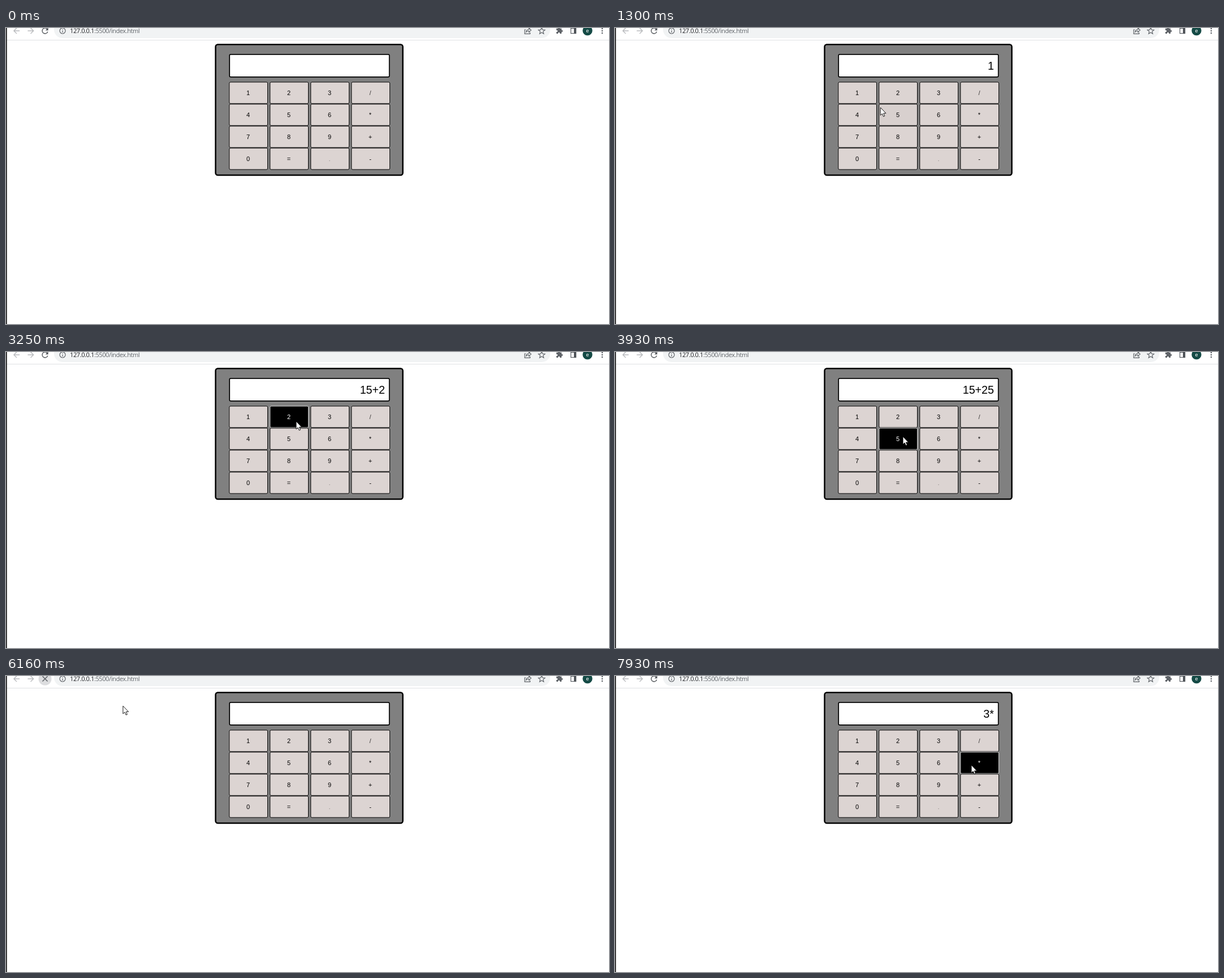
These frames come from a looping animation (1066x525 px, 8 s). An HTML page:

```html
<!DOCTYPE html>
<html lang="en">
<head>
<meta charset="utf-8">
<title>Calculator</title>
<style>
html, body { margin: 0; width: 100%; height: 100%; overflow: hidden; background: #fff; }
svg { display: block; width: 1066px; height: 525px; }
text { font-family: "Liberation Sans", Arial, sans-serif; }
.key text { font-size: 11px; text-anchor: middle; }
.url { font: 11px "Open Sans", "Noto Sans", sans-serif; letter-spacing: -.4px; fill: #5f6368; }
.line { fill: none; stroke: #5f6368; stroke-width: 1.2; }
</style>
</head>
<body>
<svg viewBox="0 0 1066 525">
  <!-- browser bar -->
  <rect x="85" y="-12" width="877" height="30" rx="15" fill="#f1f3f4"/>
  <rect y="21" width="1066" height="1" fill="#dfe1e4"/>
  <g fill="#b9bbbe">
    <path id="back" transform="translate(10.1 -3.4) scale(.7)" d="M20 11H7.83l5.59-5.59L12 4l-8 8 8 8 1.41-1.41L7.83 13H20z"/>
    <use href="#back" transform="matrix(-1 0 0 1 62.5 0)"/>
  </g>
  <circle id="halo" cx="69" cy="5" r="11.5" fill="#dcdddf"/>
  <path id="reload" fill="#505459" transform="translate(60.6 -3.4) scale(.7)" d="M17.65 6.35A8 8 0 1 0 19.73 14h-2.08A6 6 0 1 1 12 6c1.66 0 3.14.69 4.22 1.78L13 11h7V4z"/>
  <path id="stop" class="line" style="stroke-width:1.5" d="M64.5 .5l9 9m0-9l-9 9"/>
  <circle class="line" cx="100" cy="5" r="5"/>
  <path class="line" d="M100 4.5v3.5M100 2v1.3"/>
  <text class="url" x="113" y="9"><tspan fill="#202124">127.0.0.1</tspan>:5500/index.html</text>
  <path class="line" d="M919 3h-2v7.4h9.5V8M919.5 7c.4-3 2.500-4.500 5-4.500V0l3.800 3.800-3.800 3.800V5c-2 0-3.500.4-5 2z"/>
  <path class="line" d="M947-.8l1.600 3.900 4.200.3-3.200 2.700 1 4.100-3.600-2.200-3.600 2.200 1-4.100-3.200-2.700 4.200-.3z"/>
  <path fill="#5f6368" transform="translate(971.8 -2) scale(.55)" d="M20.5 11H19V7c0-1.100-.9-2-2-2h-4V3.500a2.500 2.500 0 0 0-5 0V5H4c-1.100 0-2 .9-2 2v3.800h1.500a2.700 2.700 0 0 1 0 5.400H2V20c0 1.100.9 2 2 2h3.800v-1.500a2.700 2.700 0 0 1 5.400 0V22H17c1.100 0 2-.9 2-2v-4h1.500a2.500 2.500 0 0 0 0-5z"/>
  <rect class="line" x="998.6" y=".6" width="9" height="9"/>
  <rect x="1004" width="4" height="10" fill="#505459"/>
  <circle cx="1028" cy="4.700" r="8.600" fill="#144a45"/>
  <text x="1028" y="8" font-size="9" fill="#fff" text-anchor="middle">e</text>
  <path d="M1054 1v0m0 4v0m0 4v0" stroke="#5f6368" stroke-width="2.600" stroke-linecap="round"/>
  <rect width="1.600" height="525" fill="#111"/>

  <!-- calculator -->
  <rect x="370.500" y="29.300" width="331" height="231.700" rx="4" fill="#808080" stroke="#000" stroke-width="2.500"/>
  <rect x="395.200" y="46.800" width="282.500" height="40" rx="2" fill="#fff" stroke="#000" stroke-width="1.700"/>
  <text id="display" x="669.800" y="73.600" font-size="19.600" text-anchor="end"></text>
  <g id="keys"></g>
  <path id="cursor" d="M0 0V13.800L3.100 11 5.300 16 7.500 15 5.400 10.200H9.700z" fill="#fff" stroke="#000" stroke-width=".9"/>
</svg>
<script>
const LOOP = 8000, FADE = 500, CLICK_LEAD = 150, LOAD = 350;
const LAYOUT = '123/456*789+0=.-', RELOAD = 'reload';
const LEFT = 394.3, TOP = 95.5, COL = 72, ROW = 39;
const $ = id => document.getElementById(id);

const stop = (arrive, leave, x, y, click) => ({ arrive, leave, x, y, click });

// The pointer rests at each stop and clicks shortly before it leaves.
const stops = [
  stop(0, 130, 790, 366),
  stop(550, 550, 377, 118),
  stop(760, 1150, 413, 117, '1'),
  stop(1370, 1950, 495, 152, '5'),
  stop(2145, 2600, 637, 194, '+'),
  stop(2780, 3380, 513, 123, '2'),
  stop(3600, 4000, 509, 150, '5'),
  stop(4210, 5060, 501, 241, '='),
  stop(5530, 5530, 41, 20),
  stop(5700, 6020, 67, 3, RELOAD),
  stop(6160, 6160, 206, 53),
  stop(6600, 6900, 572, 121, '3'),
  stop(7200, 7250, 640, 190),
  stop(7450, LOOP, 630, 158, '*')
];
const clicks = stops.filter(s => s.click).map(s => ({ key: s.click, time: s.leave - CLICK_LEAD }));
const reloadTime = clicks.find(c => c.key === RELOAD).time;

const svgNode = (tag, attrs, parent) => {
  const node = document.createElementNS('http://www.w3.org/2000/svg', tag);
  for (const name in attrs) node.setAttribute(name, attrs[name]);
  return parent.appendChild(node);
};

const keys = [...LAYOUT].map((char, i) => {
  const x = LEFT + COL * (i % 4), y = TOP + ROW * Math.floor(i / 4);
  const g = svgNode('g', { class: 'key' }, $('keys'));
  const box = svgNode('rect', { x: x + .5, y: y + .5, width: 67.7, height: 38, rx: 2 }, g);
  const label = svgNode('text', { x: x + 33.7, y: y + 23.5, opacity: { '/': .75, '.': .4 }[char] || 1 }, g);
  label.textContent = char;
  return { char, box, label };
});

// CSS "ease" curve
const bezier = (a, b, u) => 3 * a * u * (1 - u) ** 2 + 3 * b * u * u * (1 - u) + u ** 3;
function ease(x) {
  if (x >= 1) return 1;
  let lo = 0, hi = 1;
  for (let i = 0; i < 20; i++) {
    const mid = (lo + hi) / 2;
    if (bezier(.25, .25, mid) < x) lo = mid; else hi = mid;
  }
  return bezier(.1, 1, lo);
}

const lerp = (a, b, k) => a + (b - a) * k;
const mix = (from, to, k) => `rgb(${from.map((c, i) => Math.round(lerp(c, to[i], k)))})`;

function pointer(t) {
  const i = stops.findIndex(s => s.leave > t);
  const to = stops[i], from = stops[i - 1];
  if (t >= to.arrive) return [to.x, to.y];
  const k = (t - from.leave) / (to.arrive - from.leave);
  return [lerp(from.x, to.x, k), lerp(from.y, to.y, k)];
}

function keyAt(t) {
  const [x, y] = pointer(t);
  const col = Math.floor((x - LEFT + 2) / COL), row = Math.floor((y - TOP) / ROW);
  return col >= 0 && col < 4 && row >= 0 && row < 4 ? LAYOUT[row * 4 + col] : null;
}

// How long the pointer has been on the same key, up to the fade time
function hoverAge(t, key) {
  let age = 0;
  while (age < FADE && age < t && keyAt(t - age) === key) age += 4;
  return age;
}

function typed(text, key) {
  if (key === RELOAD) return '';
  if (key === '=') return String(text.split('+').reduce((sum, n) => sum + Number(n), 0));
  return text + key;
}

const show = (id, on) => $(id).setAttribute('visibility', on ? 'visible' : 'hidden');

function draw(t) {
  const hovered = keyAt(t);
  for (const { char, box, label } of keys) {
    const k = char === hovered ? ease(hoverAge(t, char) / FADE) : 0;
    box.setAttribute('fill', mix([220, 212, 210], [0, 0, 0], k));
    box.setAttribute('stroke', mix([0, 0, 0], [220, 220, 220], k));
    label.setAttribute('fill', mix([0, 0, 0], [255, 255, 255], k));
    label.style.opacity = k > .5 ? 1 : '';
  }
  $('display').textContent = clicks.filter(c => c.time <= t).reduce((text, c) => typed(text, c.key), '');

  const [x, y] = pointer(t);
  $('cursor').setAttribute('transform', `translate(${x} ${y})`);
  show('cursor', t >= stops[0].leave);

  const loading = t >= reloadTime && t < reloadTime + LOAD;
  show('halo', loading || Math.hypot(x - 69, y - 5) < 12);
  show('stop', loading);
  show('reload', !loading);
}

function tick() {
  draw(performance.now() % LOOP);
  requestAnimationFrame(tick);
}
tick();
</script>
</body>
</html>
```
